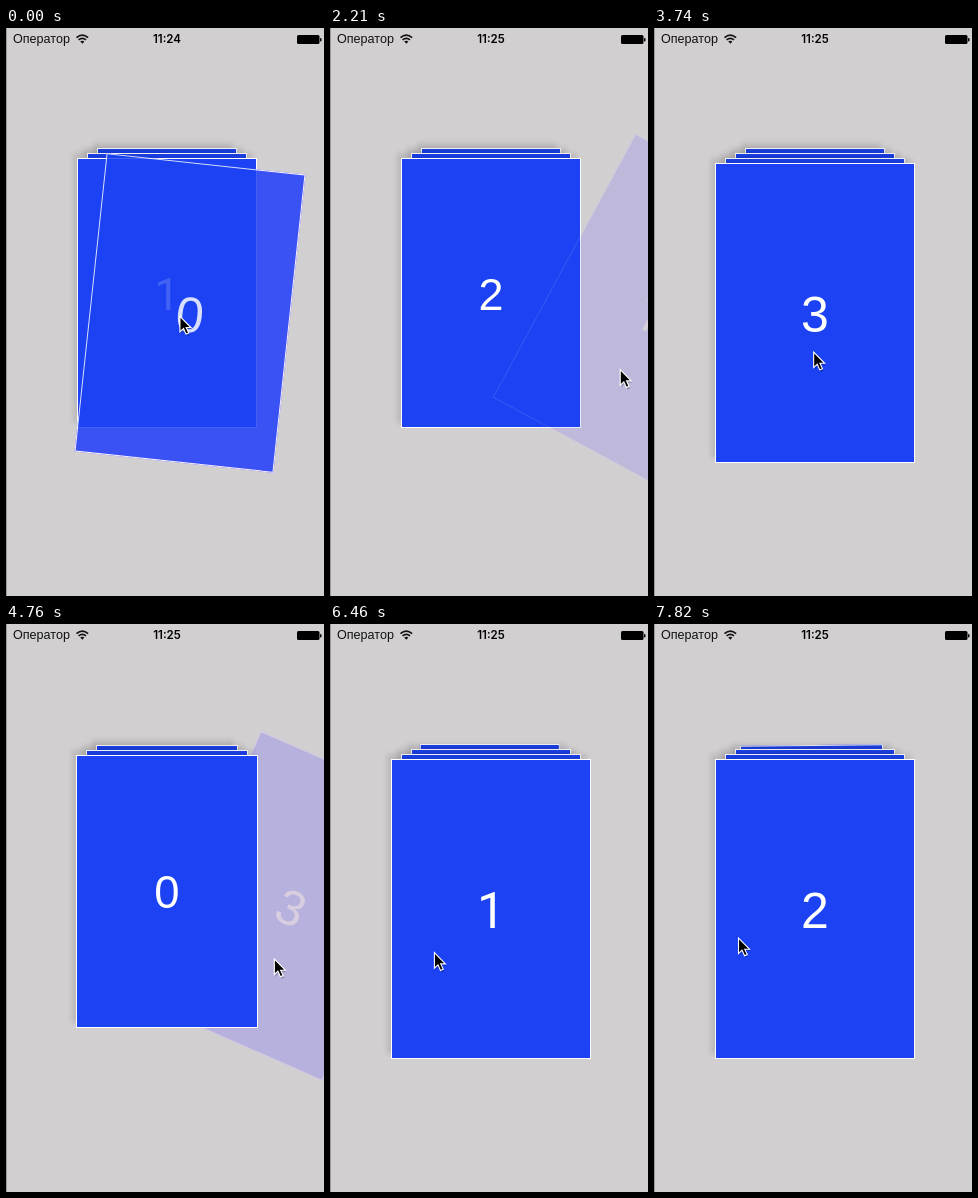
These frames come from a looping animation (318 px wide and 568 px high, 7.99 s). An HTML page:

```html
<!DOCTYPE html>
<html lang="ru">
<head>
<meta charset="utf-8">
<title>Card stack</title>
<style>
  html, body { margin: 0; width: 100%; height: 100%; overflow: hidden; background: #d2cfd1; }
  #stage { position: relative; width: 318px; height: 568px; overflow: hidden; background: #d2cfd1; }
  #stage > * { position: absolute; }
  .card {
    box-sizing: border-box; border: 1px solid #fff; background: #1c42f3; color: #fff;
    font-family: "Liberation Sans", sans-serif; line-height: 6.04em; text-align: center;
    box-shadow: -4px -5px 5px rgba(0, 0, 0, .11);
  }
  .one { font-family: Roboto, sans-serif; }
  .lifted { box-shadow: none; }
  #tint { background: #d2a0fc; z-index: 0; }
  #carrier { left: 7px; top: 4px; font: 12.6px/15px "Liberation Sans", sans-serif; color: #111; }
  #clock { left: 131px; width: 60px; top: 4px; text-align: center; font: 600 11.5px/15px Inter, sans-serif; color: #000; }
  #overlay { left: 0; top: 0; z-index: 10; }
</style>
</head>
<body>
<div id="stage">
  <div id="tint"></div>
  <div id="carrier">Оператор</div>
  <div id="clock"></div>
  <svg id="overlay" width="318" height="568">
    <g fill="none" stroke="#111" stroke-width="1.7">
      <path d="M70.5 9.6Q76.3 4.6 82.1 9.6M72.6 11.9Q76.3 8.8 80 11.9"/>
      <path d="M76.3 15.8L74.2 13.5Q76.3 11.8 78.4 13.5Z" fill="#111" stroke="none"/>
    </g>
    <rect x="291" y="7" width="22.5" height="9" rx="1.5"/>
    <rect x="314" y="10" width="1.5" height="3.5" rx=".7"/>
    <path d="M.5 0V568" stroke="#9a989a"/>
    <g id="cursor">
      <path d="M1 2V17.5L4.7 14.2L7.2 20L10 18.8L7.5 13.2H12.3Z" opacity=".2"/>
      <path d="M0 0V15.5L3.6 12.2L6.1 17.8L8.8 16.6L6.3 11.2H11Z" stroke="#fff" stroke-width="1.1"/>
    </g>
  </svg>
</div>
<script>
const LOOP = 7990, STEP = 170, COUNT = 4;
const PROMOTE = 300, RETURN = 480;

// Every swipe pulls the front card; the pointer drifts from one swipe to the next.
const swipe = (grab, release, x, y, dx, dy) => ({ grab, release, x, y, dx, dy });
const swipes = [
  swipe(-170, 510, 150.5, 288, 150, 2),
  swipe(1680, 2300, 129, 287, 171, 58),
  swipe(2850, 3230, 150, 315, 105, 15),
  swipe(3910, 4700, 142, 323, 130, 12),
  swipe(5270, 6000, 153.5, 335, -85, 3),
  swipe(6900, 7400, 138, 320, -53.5, -6)
];

const clamp = v => Math.max(0, Math.min(1, v));
const mix = (a, b, k) => a + (b - a) * k;
const ease = (t, from, to) => {
  const k = clamp((t - from) / (to - from));
  return k * k * (3 - 2 * k);
};

const stage = document.getElementById('stage');
const tint = document.getElementById('tint');
const clock = document.getElementById('clock');
const cursor = document.getElementById('cursor');
const cards = Array.from({ length: COUNT }, (_, i) => {
  const card = document.createElement('div');
  card.className = i === 1 ? 'card one' : 'card';
  card.textContent = i;
  return stage.appendChild(card);
});

const slotPose = slot => ({ x: 0, y: -20 * slot, scale: 1 - slot / 10, turn: 0, alpha: 1 });

const dragPose = x => ({
  x, y: 0, scale: 1,
  turn: x / (3.5 + 0.0135 * Math.abs(x)),
  alpha: Math.max(0.11, 1 - Math.abs(x) / 140)
});

function mixPose(a, b, k) {
  const pose = {};
  for (const key in a) pose[key] = mix(a[key], b[key], k);
  return pose;
}

function pointerAt(t, last, current) {
  if (!current) return [last.x + last.dx, last.y + last.dy];
  if (t < current.grab) {
    const k = ease(t, last.release, current.grab);
    return [mix(last.x + last.dx, current.x, k), mix(last.y + last.dy, current.y, k)];
  }
  const k = ease(t, current.grab, current.release);
  return [current.x + current.dx * k, current.y + current.dy * k];
}

function place(element, { x, y, scale, turn, alpha }) {
  Object.assign(element.style, {
    left: `${161 + x - 100 * scale}px`,
    top: `${285 + y - 150 * scale}px`,
    width: `${200 * scale}px`,
    height: `${300 * scale}px`,
    fontSize: `${50 * scale}px`,
    transform: turn ? `rotate(${turn}deg)` : 'none',
    opacity: alpha
  });
}

function draw(t) {
  const done = swipes.filter(s => s.release <= t).length;
  const last = swipes[done - 1], current = swipes[done];
  const [px, py] = pointerAt(t, last, current);
  cursor.setAttribute('transform', `translate(${px} ${py})`);
  clock.textContent = t < 680 ? '11:24' : '11:25';
  tint.style.opacity = 0;

  cards.forEach((card, i) => {
    const slot = (i - done % COUNT + COUNT) % COUNT;
    let pose = slotPose(slot);
    if (slot === 0 && current && t >= current.grab) {
      pose = dragPose(px - current.x);
    } else if (last && slot === COUNT - 1) {
      pose = mixPose(dragPose(last.dx), pose, ease(t, last.release, last.release + RETURN));
    } else if (last) {
      pose = slotPose(slot + 1 - ease(t, last.release, last.release + PROMOTE));
    }
    place(card, pose);
    card.style.zIndex = COUNT - slot;

    // A violet backing warms the see-through part outside the stack.
    const lifted = pose.alpha < 1;
    card.classList.toggle('lifted', lifted);
    if (lifted) place(tint, { ...pose, alpha: ease(pose.alpha, 0, 0.5) });
  });
}

function tick(now) {
  draw(Math.floor(now % LOOP / STEP) * STEP);
  requestAnimationFrame(tick);
}
draw(0);
requestAnimationFrame(tick);
</script>
</body>
</html>
```
